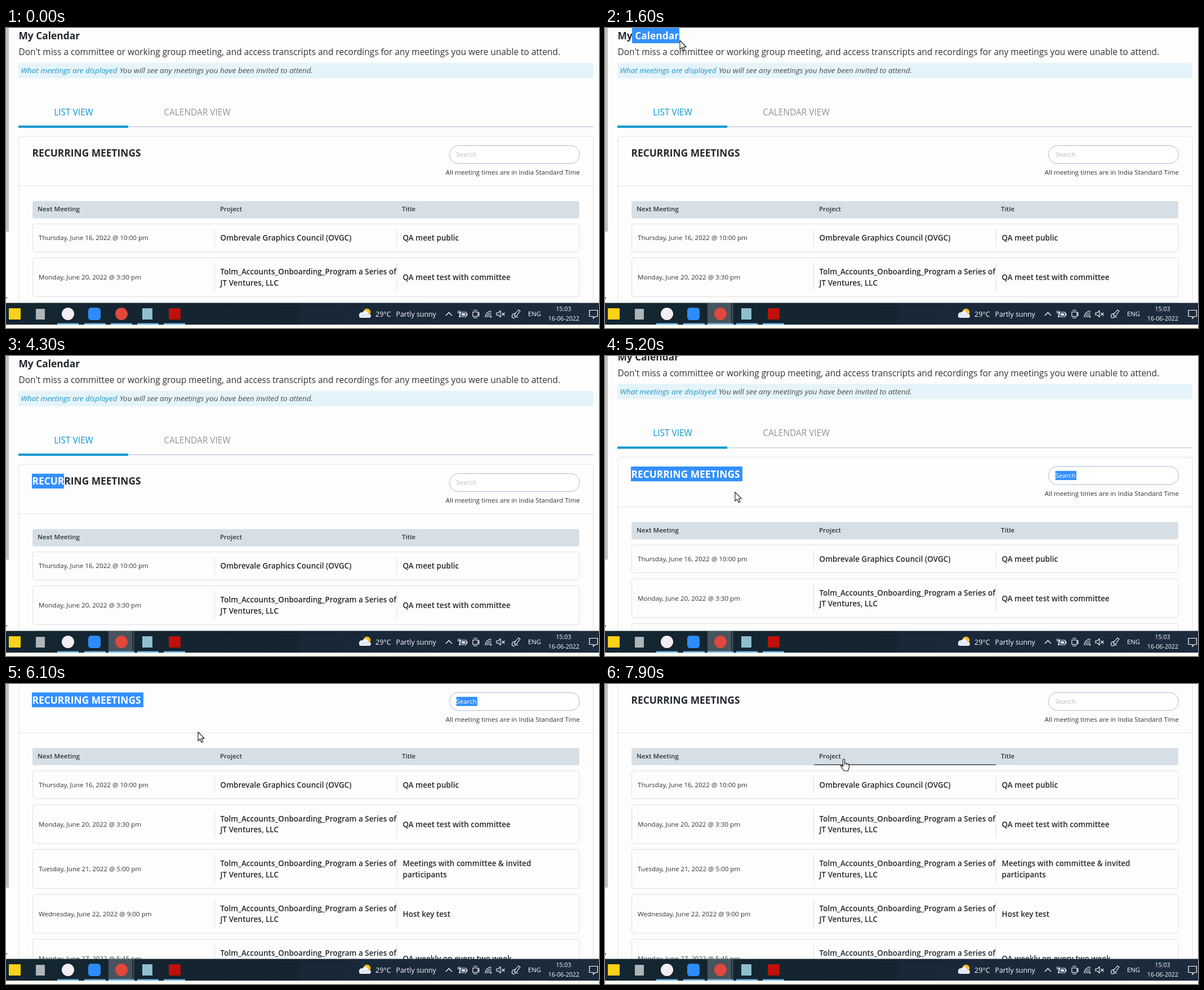
An HTML page with a canvas for the animation above (8000 ms loop, 1053 px wide and 532 px high).

```html
<!DOCTYPE html>
<html lang="en">
<head>
<meta charset="utf-8">
<title>Meeting list</title>
<style>
html, body { margin: 0; width: 100%; height: 100%; overflow: hidden; background: #fdfdfd; }
canvas { display: block; }
</style>
</head>
<body>
<canvas id="stage" width="1053" height="532"></canvas>
<script>
const ctx = document.getElementById('stage').getContext('2d');
const LOOP = 8000, STEP = 100;
const INK = '#23282d', BLUE = '#0c98cf', PICK = '#3390ff';
const SMALL = 11.58, CELL = 13.5, BODY = 15.44, TITLE = 17.37;
const COLS = [47, 371, 694, 1018];

const SERIES = ['Tolm_Accounts_Onboarding_Program a Series of', 'JT Ventures, LLC'];
const ROWS = [
  ['Thursday, June 16, 2022 @ 10:00 pm', ['Ombrevale Graphics Council (OVGC)'], ['QA meet public']],
  ['Monday, June 20, 2022 @ 3:30 pm', SERIES, ['QA meet test with committee']],
  ['Tuesday, June 21, 2022 @ 5:00 pm', SERIES, ['Meetings with committee & invited', 'participants']],
  ['Wednesday, June 22, 2022 @ 9:00 pm', SERIES, ['Host key test']],
  ['Monday, June 27, 2022 @ 5:45 pm', SERIES, ['QA weekly on every two week']]
];

// Each key: time, then the values reached at that time
const POINTER = [
  [0, 224, 58], [100, 222, 57], [500, 150, 32], [900, 48, 12], [1000, 48, 12],
  [1100, 100, 14], [1300, 112, 16], [1600, 133, 22], [2100, 88, 137], [2200, 96, 140],
  [2300, 98, 142], [2500, 98, 142], [3400, 60, 212], [3600, 47, 222], [4200, 47, 222],
  [4300, 103, 222], [4700, 231, 242], [5500, 231, 241], [5600, 231, 241], [6100, 341, 85],
  [6500, 341, 85], [7000, 200, 122], [7400, 416, 146], [7600, 343, 176], [7700, 343, 176],
  [7800, 420, 136], [7900, 424, 133]
];
const SCROLL = [[0, 0], [5100, 0], [5200, 12.5], [5300, 12.5], [5400, 100], [5500, 177], [5600, 193.5]];

function track(keys, t) {
  const i = keys.findIndex(k => k[0] > t);
  if (i < 0) return keys[keys.length - 1].slice(1);
  const a = keys[i - 1], b = keys[i], f = (t - a[0]) / (b[0] - a[0]);
  return a.slice(1).map((v, n) => v + (b[n + 1] - v) * f);
}

function text(str, x, y, size, color = INK, style = '400', align = 'left') {
  ctx.font = `${style} ${size}px "Open Sans", "Noto Sans", sans-serif`;
  ctx.fillStyle = color;
  ctx.textAlign = align;
  ctx.fillText(str, x, y);
}

function rect(x, y, w, h, color) {
  ctx.fillStyle = color;
  ctx.fillRect(x, y, w, h);
}

function box(x, y, w, h, r, fill, stroke) {
  ctx.beginPath();
  ctx.roundRect(x, y, w, h, r);
  if (fill) { ctx.fillStyle = fill; ctx.fill(); }
  if (stroke) { ctx.strokeStyle = stroke; ctx.lineWidth = 1; ctx.stroke(); }
}

function disc(x, y, r, color) {
  ctx.beginPath();
  ctx.arc(x, y, r, 0, 7);
  ctx.fillStyle = color;
  ctx.fill();
}

function stroke(path, color = '#fff', width = 1.1) {
  ctx.strokeStyle = color;
  ctx.lineWidth = width;
  ctx.stroke(new Path2D(path));
}

// Selected span: blue block with its text repainted in white
function pick(x0, x1, y, h, paint) {
  if (x1 <= x0) return;
  ctx.save();
  ctx.beginPath();
  ctx.rect(x0, y, x1 - x0, h);
  ctx.clip();
  rect(x0, y, x1 - x0, h, PICK);
  paint('#fff');
  ctx.restore();
}

function drawIntro(t, px) {
  const title = c => text('My Calendar', 22.5, 20, TITLE, c, '700');
  title(INK);
  if (t >= 1000 && t < 3600) pick(48, t < 1600 ? Math.min(px, 132) : 132, 0, 27, title);
  text("Don't miss a committee or working group meeting, and access transcripts and recordings for any meetings you were unable to attend.",
    22.5, 48, BODY, '#333');
  box(22, 62, 1021, 27, 3, '#e4f4fa');
  text('What meetings are displayed', 26.5, 80, CELL, '#2196c4', 'italic 400');
  text('You will see any meetings you have been invited to attend.', 202, 80, CELL, '#4c4c4c', 'italic 400');

  text('LIST VIEW', 120, 154.5, BODY, BLUE, '400', 'center');
  text('CALENDAR VIEW', 339.5, 154.5, BODY, '#939393', '400', 'center');
  rect(22, 174.3, 1021, 1.7, '#cbd4df');
  rect(22, 173, 195, 4, BLUE);
}

function drawRow(row, y, h) {
  const mid = y + h / 2;
  box(47.5, y, 970.5, h, 4, null, '#dcdfe2');
  rect(370, y + 10, 1, h - 20, '#d5dde5');
  rect(693.5, y + 10, 1, h - 20, '#d5dde5');
  text(row[0], 58, mid + 4, SMALL, '#333');
  [[row[1], 380.5], [row[2], 704.5]].forEach(([lines, x]) => lines.forEach((s, i) =>
    text(s, x, mid + 5 + (i - (lines.length - 1) / 2) * 19.4, CELL, INK, '600')));
}

function drawTable(t, px, hover) {
  box(22.5, 192, 1020.5, 900, 5, null, '#e0e2e4');
  rect(22.5, 279.5, 1020.5, 1, '#e0e2e4');

  const heading = c => text('RECURRING MEETINGS', 46.5, 228, TITLE, c, '700');
  const search = c => text('Search', 799.5, 228, SMALL, c);
  heading(INK);
  box(787.5, 208.5, 231, 32, 16, '#fff', '#a8bacf');
  search('#b3bcc6');
  if (t >= 4300 && t < 6300) {
    pick(46, t < 4700 ? px : 244, 208.5, 26.5, heading);
    if (t >= 4700) pick(799.5, 837, 216, 16.5, search);
  }
  text('All meeting times are in India Standard Time', 1019, 260, SMALL, '#333', '400', 'right');

  box(47, 307, 971, 30.5, 3, '#d7dfe6');
  ['Next Meeting', 'Project', 'Title'].forEach((s, i) =>
    text(s, COLS[i] + 9, 325, SMALL, '#2d3338', '600'));
  if (hover >= 0) rect(COLS[hover], 336, COLS[hover + 1] - COLS[hover], 1.5, '#43484d');

  let y = 347.5;
  ROWS.forEach((row, i) => {
    const h = i ? 69 : 49.5;
    drawRow(row, y, h);
    y += h + 10.5;
  });
}

function drawTray() {
  disc(641, 504, 6.5, '#f9b928');
  disc(632, 509, 5, '#e3e9f0');
  disc(638, 507, 5.5, '#eef2f6');
  box(627, 507, 21, 7, 3.5, '#e3e9f0');
  text('29°C', 656, 512, 12.6, '#fff');
  text('Partly sunny', 692.5, 512, 12.4, '#fff');
  stroke('M781 510l5.5-5.5 5.5 5.5', '#fff', 1.3);
  stroke('M806 504h11v8h-11zM817 506.500h2v3h-2M803 501v4M806 501v4M802 505h5v3l-2 2v3');
  rect(809, 506, 6, 4, '#fff');
  stroke('M829 503.500h9v8h-9zM838 506l2-1v5l-2-1M830 500.500h7M830 514h7');
  stroke('M851 513a11 11 0 0 1 11-11M854 513a8 8 0 0 1 8-8M857 513a5 5 0 0 1 5-5');
  disc(861, 512, 1.4, '#fff');
  stroke('M871 505h3l4-3.500v11l-4-3.500h-3zM880.500 505l5 5M885.500 505l-5 5');
  stroke('M903 508l7-8 3 2-6 8-4 1zM904 506c-5 0-7 6-4 8s5-4 9-1');
  text('ENG', 927, 511, 11.3, '#fff');
  text('15:03', 990, 502, 10.6, '#fff', '400', 'center');
  text('16-06-2022', 990.5, 519, 10.6, '#fff', '400', 'center');
  stroke('M1036 500.500h14.500v11h-4l-3.500 3.500v-3.500h-7z', '#fff', 1.2);
}

function drawTaskbar(active) {
  const bar = ctx.createLinearGradient(0, 0, 1053, 0);
  bar.addColorStop(0, '#142630');
  bar.addColorStop(0.49, '#14242f');
  bar.addColorStop(0.5, '#182838');
  bar.addColorStop(1, '#1c2b3d');
  rect(0, 487.5, 1053, 38.5, bar);
  rect(0, 526, 1053, 6, '#fdfdf4');
  if (active) {
    rect(182, 488, 42, 38, '#48545e');
    rect(225, 488, 3, 38, '#34424d');
  }
  [91, 139, 233, 280].forEach(x => rect(x, 523.5, 38, 2.5, '#76b9ed'));
  rect(active ? 182 : 186, 523.5, active ? 46 : 38, 2.5, '#76b9ed');

  rect(5, 497, 21, 20, '#fbd116');
  rect(53, 498, 16, 19, '#aeb5b8');
  disc(110, 507, 11, '#f3eef2');
  box(146, 496, 22, 22, 5, '#2d8cff');
  disc(205, 507, 11, '#e2483c');
  rect(242, 497, 18, 20, '#8fc0cf');
  box(289, 497, 21, 20, 3, '#c01009');
  drawTray();
}

function drawPointer(x, y, hand) {
  ctx.save();
  ctx.translate(x, y);
  const shape = new Path2D(hand
    ? 'M-1.500 1q1.500-2 3 0v6l6 1.500q2 .5 2 2.500v4l-2 6h-7l-6-8q0-2.500 2-1.500l2 2z'
    : 'M0 0v16l3.700-3.500 2.500 6 2.600-1.100-2.500-5.800h5z');
  ctx.fillStyle = '#fff';
  ctx.fill(shape);
  ctx.strokeStyle = '#111';
  ctx.lineWidth = 1.1;
  ctx.lineJoin = 'round';
  ctx.stroke(shape);
  if (hand) stroke('M1.500 7v4M4.500 8v3M7.200 9v2.500', '#111', 0.9);
  ctx.restore();
}

function draw(t) {
  const [px, py] = track(POINTER, t);
  const [scroll] = track(SCROLL, t);
  const pageY = py + scroll;
  const overHead = pageY > 307 && pageY < 338 && px > COLS[0] && px < COLS[3];
  const overTab = pageY > 125 && pageY < 173 && px < 217;
  const hover = overHead ? COLS.findIndex(c => c > px) - 1 : -1;

  rect(0, 0, 1053, 532, '#fdfdfd');
  ctx.save();
  ctx.translate(0, -scroll);
  drawIntro(t, px);
  drawTable(t, px, hover);
  ctx.restore();

  rect(0, 0, 5, 361, '#c1c1c1');
  rect(0, 478, 2, 1.5, '#222');
  drawTaskbar(t >= 1000);

  // The text caret pointer is not visible over text
  const overText = t < 100 || (t >= 800 && t < 1300) || (t >= 3500 && t < 4600);
  if (!overText) drawPointer(px, py, overHead || overTab);
}

function tick(now) {
  draw(Math.floor((now % LOOP) / STEP) * STEP);
  requestAnimationFrame(tick);
}
requestAnimationFrame(tick);
</script>
</body>
</html>
```
